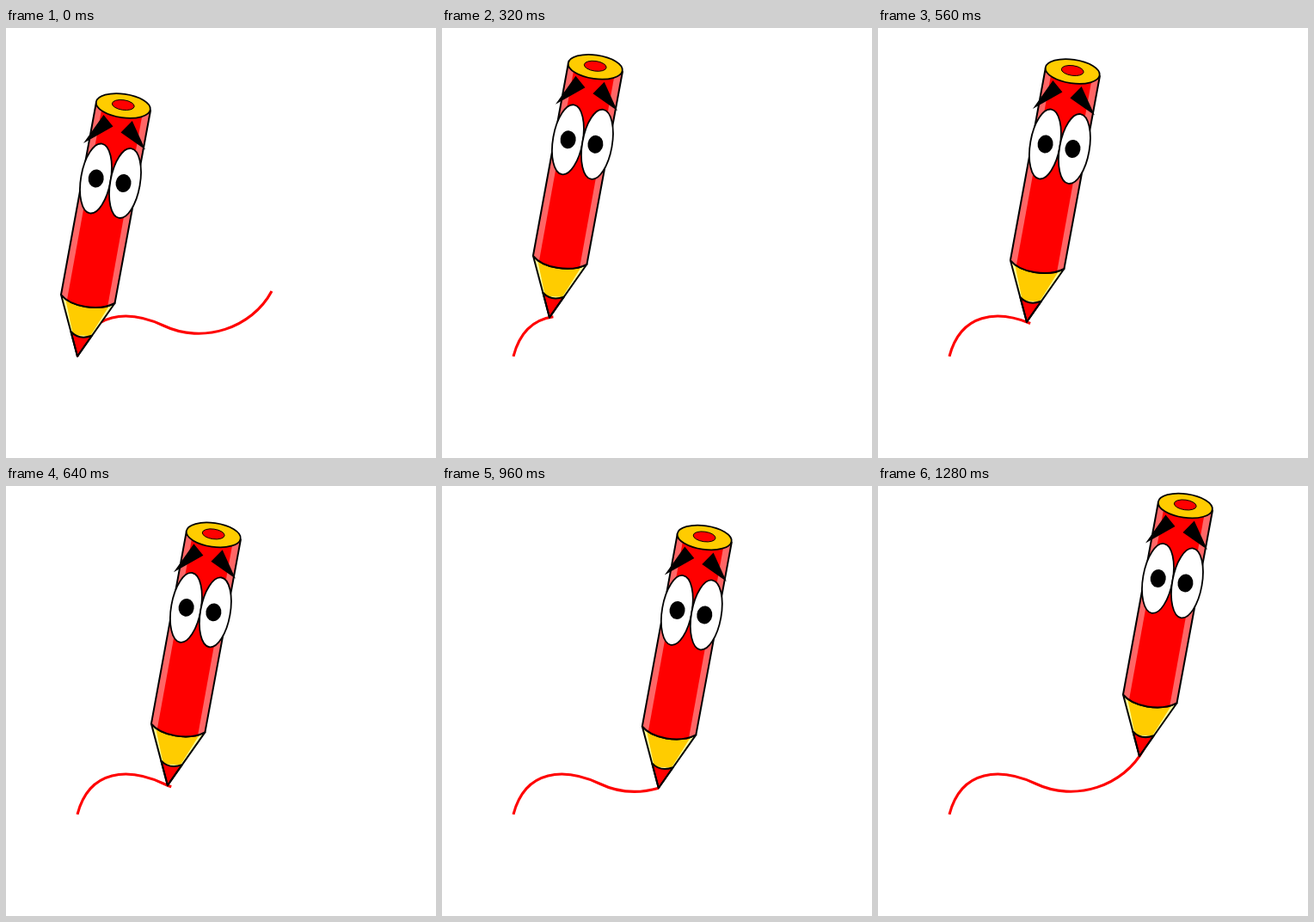
Write an HTML page with a canvas that moves like this. It is 500 by 500 pixels and loops after 2000 ms.

```html
<!DOCTYPE html>
<html lang="en">
<head>
<meta charset="utf-8">
<title>Drawing pencil</title>
<style>
  html, body { margin: 0; width: 100%; height: 100%; overflow: hidden; background: #fff; }
  canvas { display: block; }
</style>
</head>
<body>
<canvas id="stage" width="500" height="500"></canvas>
<script>
const ctx = document.getElementById('stage').getContext('2d');

const LOOP = 2000, STEP = 80, LAST_STEP = 16, BLINK_STEP = 2;
const STRIDE = 16.3; // path length covered per step
const START = { x: 83, y: 381.8 };
const RED = '#f00', PINK = '#f66', YELLOW = '#fc0', PALE = '#ff9';

const TRAIL = `M${START.x} ${START.y}C97 328.5 143 327.5 183 346C229 368 286 349 309 306`;
const trail = new Path2D(TRAIL);
const ruler = document.createElementNS('http://www.w3.org/2000/svg', 'path');
ruler.setAttribute('d', TRAIL);
const trailLength = ruler.getTotalLength();

function shape(d, fill, stroke, width = 2) {
  const path = new Path2D(d);
  if (fill) {
    ctx.fillStyle = fill;
    ctx.fill(path);
  }
  if (stroke) {
    ctx.strokeStyle = stroke;
    ctx.lineWidth = width;
    ctx.stroke(path);
  }
}

function ellipse(x, y, rx, ry, degrees, fill, width) {
  ctx.beginPath();
  ctx.ellipse(x, y, rx, ry, degrees * Math.PI / 180, 0, Math.PI * 2);
  ctx.fillStyle = fill;
  ctx.fill();
  if (width) {
    ctx.strokeStyle = '#000';
    ctx.lineWidth = width;
    ctx.stroke();
  }
}

function drawTrail(length) {
  ctx.save();
  ctx.lineWidth = 3.1;
  ctx.strokeStyle = RED;
  ctx.setLineDash([length, 1000]);
  ctx.stroke(trail);
  ctx.restore();
}

function drawBody() {
  const collar = 'C75 324 107 330 126.5 320';
  const body = `M105 86L64 310${collar}L168 96Z`;
  const wood = `M64 310${collar}L${START.x} ${START.y}Z`;

  shape(wood, PALE);
  shape('M69 314C83 325 106 328 120 323L98 358L78 357Z', YELLOW);
  shape(`M75.5 353C82 360 91 361 99.8 357.8L${START.x} ${START.y}Z`, RED, '#000');
  shape(wood, null, '#000');

  shape(body, PINK);
  shape('M112 90L71 316C84 325 105 327 118 324.5L159 98Z', RED);
  shape(body, null, '#000');

  ellipse(136.3, 90.5, 31.8, 13.8, 8, YELLOW, 1.8);
  ellipse(136.3, 89.5, 13, 5.8, 8, RED, 1);
}

function drawFace(blinking) {
  ellipse(104.5, 175, 17.3, 41, 10, '#fff', 1.8);
  ellipse(138.5, 180.5, 17.3, 41, 10, '#fff', 1.8);

  if (blinking) {
    shape('M88 167Q96 189 121.5 176M121.5 177Q134 196 155.5 178', null, '#000');
    shape('M94.5 126L111.5 91L124.5 103ZM135.5 107L149.5 99L157.5 134Z', '#000');
  } else {
    ellipse(104.7, 175, 9, 10.5, 8, '#000');
    ellipse(136.5, 180.5, 9, 10.5, 8, '#000');
    shape('M90 134L113.5 101L124.5 114.5ZM133.5 121.5L146.8 108L162 141.5Z', '#000');
  }
}

function draw(step) {
  const reach = Math.min(step * STRIDE, trailLength);
  const tip = ruler.getPointAtLength(reach);
  // The line runs slightly ahead of the tip in the first part.
  const lead = step <= 10 ? 4.5 : 0;
  const complete = step === 0 || step === LAST_STEP;

  ctx.fillStyle = '#fff';
  ctx.fillRect(0, 0, 500, 500);
  drawTrail(complete ? trailLength : reach + lead);

  ctx.save();
  ctx.translate(tip.x - START.x, tip.y - START.y);
  ctx.lineJoin = 'round';
  drawBody();
  drawFace(step === BLINK_STEP);
  ctx.restore();
}

function tick() {
  const time = performance.now() % LOOP;
  draw(Math.min(LAST_STEP, Math.floor(time / STEP)));
  requestAnimationFrame(tick);
}
tick();
</script>
</body>
</html>
```
